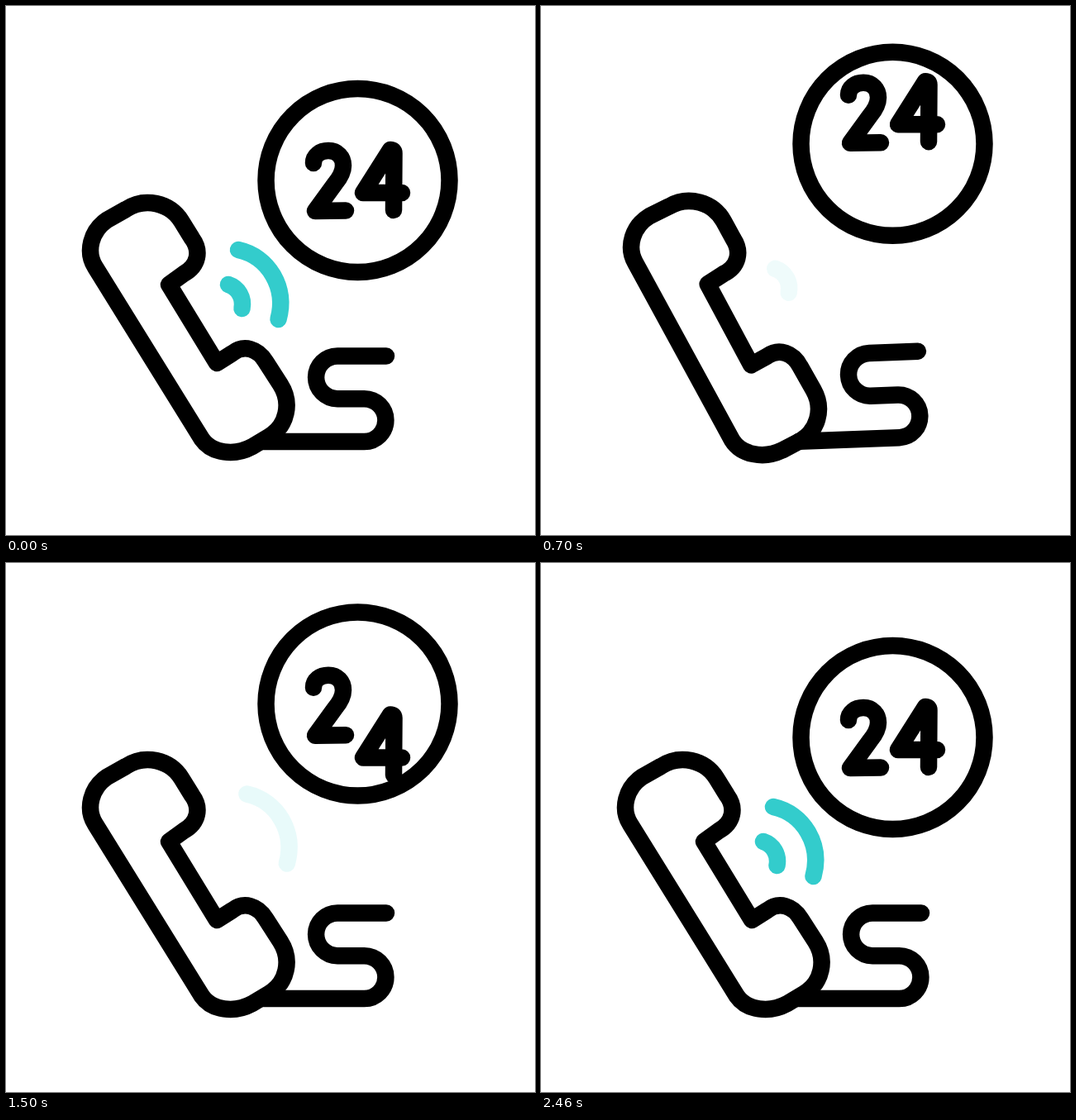
Recreate the animation shown at these times as an HTML page. Size 640x640 px, loop 2780 ms.

```html
<!DOCTYPE html>
<html lang="en">
<head>
<meta charset="utf-8">
<title>Round-the-clock call</title>
<style>
  html, body { margin: 0; width: 100%; height: 100%; overflow: hidden; background: #fff; }
  svg { display: block; width: 100vw; height: 100vh; }
</style>
</head>
<body>
<svg viewBox="0 0 640 640" fill="none" stroke="#000" stroke-width="20.5" stroke-linecap="round" stroke-linejoin="round">
  <clipPath id="dial"><circle cx="425.5" cy="211" r="112"/></clipPath>
  <path id="cord" d="M312 527H433.5a25.8 25.8 0 0 0 0-51.8H401a25.8 25.8 0 0 1 0-51.8H460"/>
  <path id="phone" d="M108 316C96 297 103 272 122 259L145 246C168 231 198 238 212 260L225 281C236 296 233 314 215 324L197 337L255 432L274 420C288 409 305 415 314 430L332 458C346 480 340 508 318 521L298 533C276 545 249 541 237 524Z"/>
  <g stroke="#3cc">
    <path id="inner" d="M269 337C281 341 288 353 285.5 366"/>
    <path id="outer" d="M281 295C318 303 340 341 329.5 379"/>
  </g>
  <g id="badge">
    <g clip-path="url(#dial)">
      <path id="two" d="M372 190C372 181 380 175 390 175C401 175 408 183 408 193C408 202 403 209 398 215L374 248L411 247.5"/>
      <path id="four" d="M469 247L469.5 178Q469.5 174 465 174L432 226H479"/>
    </g>
    <circle cx="425.5" cy="211" r="111"/>
  </g>
</svg>
<script>
const LOOP = 2780, STEP = 20, FOUR_DELAY = 130;

const el = id => document.getElementById(id);
const clamp = (x, low, high) => Math.min(high, Math.max(low, x));
const progress = (t, start, end) => clamp((t - start) / (end - start), 0, 1);

function ease(t, start, end) {
  const p = progress(t, start, end);
  return p * p * (3 - 2 * p);
}

// Leaves rest, swings from a to b twice in even beats, then returns to rest.
function swing(t, start, first, beat, end, a, b) {
  const last = first + 3 * beat;
  const phase = Math.PI * (clamp(t, first, last) - first) / beat;
  const value = a + (b - a) * (1 - Math.cos(phase)) / 2;
  return value * ease(t, start, first) * (1 - ease(t, last, end));
}

// Winds up, drops out of the dial, springs back past rest and settles.
function hop(t) {
  return -45 * ease(t, 295, 655) + 185 * ease(t, 655, 1040)
    - 172 * ease(t, 1040, 1680) + 32 * ease(t, 1680, 2190);
}

const shake = (t, a, b) => swing(t, 235, 470, 235, 1410, a, b);

function shift(id, x, y) {
  el(id).setAttribute('transform', `translate(${x} ${y})`);
}

function turn(id, angle, x, y) {
  el(id).setAttribute('transform', `rotate(${angle} ${x} ${y})`);
}

// Drifts away while fading, then fades back in at rest; t counts from the start.
function pulse(id, t, fade, back, full, dx, dy) {
  const fading = t < fade;
  const drift = fading ? progress(t, 0, fade) : 0;
  shift(id, dx * drift, dy * drift);
  el(id).setAttribute('opacity', fading ? 1 - ease(t, 0, fade) : ease(t, back, full));
}

function draw(t) {
  shift('badge', 0, swing(t, 295, 755, 407, 2460, -46, 34));
  shift('two', 0, hop(t));
  shift('four', 0, hop(t - FOUR_DELAY));
  turn('phone', shake(t, -2.4, 3.2), 212, 420);
  turn('cord', shake(t, 1.5, -2.2), 308, 527);
  if (t < 910) pulse('inner', t - 300, 480, 480, 600, 17, -23);
  else pulse('inner', t - 910, 600, 760, 990, 17, -23);
  pulse('outer', t < 1190 ? t - 200 : t - 1190, 390, 800, 990, 13, -19.5);
}

const origin = performance.now();
function tick() {
  const t = (performance.now() - origin) % LOOP;
  draw(Math.floor(t / STEP) * STEP);
  requestAnimationFrame(tick);
}
draw(0);
tick();
</script>
</body>
</html>
```
